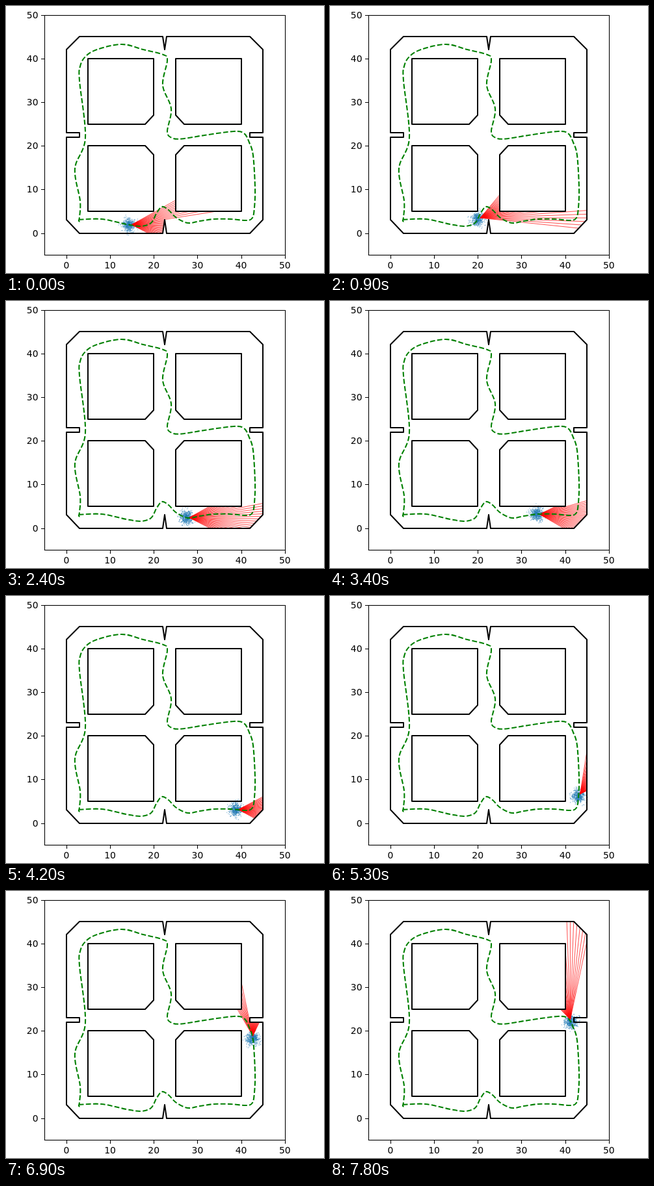
Write an HTML page with a canvas that moves like this. It is 489 by 411 pixels and loops after 8000 ms.

```html
<!DOCTYPE html>
<html lang="en">
<head>
<meta charset="utf-8">
<title>Particle filter localisation</title>
<style>
  html, body { margin: 0; width: 100%; height: 100%; overflow: hidden; background: #fff; }
  canvas, svg { position: absolute; left: 0; top: 0; width: 489px; height: 411px; }
  text { font: 13.9px "DejaVu Sans", sans-serif; }
</style>
</head>
<body>
<canvas id="scan" width="489" height="411"></canvas>
<svg id="map" width="489" height="411" viewBox="0 0 489 411"></svg>
<script>
const LOOP = 8000;
const RAD = Math.PI / 180;
const ROUTE_START = 78;   // distance already covered when the loop begins
const X = v => 59.2 + (v + 5) * 6.72;
const Y = v => 383.2 - (v + 5) * 6.72;

// The map is one quadrant mirrored both ways about its centre.
const border = [[22.5, 3], [23, 0], [42, 0], [45, 3], [45, 22], [42, 22], [42, 22.5]];
const block = [[5, 5], [20, 5], [20, 18], [18, 20], [5, 20], [5, 5]];
const mirrored = line => [[0, 0], [1, 0], [0, 1], [1, 1]].map(([mx, my]) =>
  line.map(([x, y]) => [Math.round(X(mx ? 45 - x : x)), Math.round(Y(my ? 45 - y : y))]));
const walls = [...mirrored(border), ...mirrored(block)];
const segments = walls.flatMap(w => w.slice(1).map((p, i) => [w[i], p]));

// Key points of the planned route, in pixels.
const route = [
  [112, 329], [147, 328], [185, 336], [207, 339], [223, 334], [232, 318], [240, 309],
  [250, 314], [262, 326], [280, 334], [298, 331], [320, 328], [345, 328], [370, 330],
  [379, 326], [382, 310], [383, 280], [380, 230], [374, 210], [366, 196], [350, 193],
  [305, 199], [270, 204.5], [255, 203], [248, 193], [254, 158], [241, 122], [248, 84],
  [242, 75], [211, 67], [178, 59], [140, 67], [122, 78], [114, 93], [113, 115],
  [122, 203], [106, 250], [114, 300], [113, 325], [112, 331], [117, 332]
];

// Time, distance travelled along the route, heading in degrees.
const drive = [
  [0, 0, 1], [900, 43, 22], [1300, 62, 43], [1500, 67, 40], [2000, 90, -26], [2400, 112, 1],
  [3400, 153, -2], [4400, 197, 0], [5300, 234, 53], [5700, 255, 84], [6900, 315, 92],
  [7800, 342, 106]
];

// The estimate updates in even bursts: first, last (tenths of a second), intervals.
const updates = [0];
for (const [first, last, n] of [[1, 15, 9], [18, 53, 22], [56, 78, 14]])
  for (let i = 0; i <= n; i++) updates.push(100 * Math.round(first + (last - first) * i / n));

function smooth(pts) {
  let d = `M${pts[0]}`;
  for (let i = 0; i < pts.length - 1; i++) {
    const a = pts[Math.max(i - 1, 0)], b = pts[i], c = pts[i + 1];
    const e = pts[Math.min(i + 2, pts.length - 1)];
    const p = b.map((v, k) => v + (c[k] - a[k]) / 6);
    const q = c.map((v, k) => v - (e[k] - b[k]) / 6);
    d += `C${p} ${q} ${c}`;
  }
  return d;
}

function drawMap() {
  let ticks = '', labels = '';
  for (let v = 0; v <= 50; v += 10) {
    ticks += `M${Math.round(X(v)) + .5} 384v5M59 ${Math.round(Y(v)) + .5}h-5`;
    labels += `<text x="${X(v)}" y="404" text-anchor="middle">${v}</text>`
            + `<text x="49.5" y="${Math.round(Y(v) + 5)}" text-anchor="end">${v}</text>`;
  }
  const outline = walls.map(w => `M${w.join('L')}`).join('');
  document.getElementById('map').innerHTML =
    `<g fill="none" stroke="#000">
      <path d="${outline}" stroke-width="2" stroke-linejoin="round" stroke-linecap="round"/>
      <path id="route" d="${smooth(route)}" stroke="#008000" stroke-width="2.08" stroke-dasharray="7.7 3.33"/>
      <path d="${ticks}" stroke-width="1.1"/>
      <rect x="59.5" y="14.5" width="370" height="369" stroke-width="1.1"/>
    </g>${labels}`;
}

function poseAt(t) {
  const i = Math.max(1, drive.findIndex(k => k[0] >= t));
  const a = drive[i - 1], b = drive[i];
  const k = (t - a[0]) / (b[0] - a[0]);
  const [dist, heading] = [1, 2].map(n => a[n] + (b[n] - a[n]) * k);
  const { x, y } = document.getElementById('route').getPointAtLength(ROUTE_START + dist);
  return { x, y, heading };
}

function castRay(x, y, dx, dy) {
  let best = 400;
  for (const [[ax, ay], [bx, by]] of segments) {
    const ex = bx - ax, ey = by - ay;
    const det = dx * ey - dy * ex;
    if (Math.abs(det) < 1e-9) continue;
    const dist = ((ax - x) * ey - (ay - y) * ex) / det;
    const u = ((ax - x) * dy - (ay - y) * dx) / det;
    if (dist > 0 && dist < best && u >= 0 && u <= 1) best = dist;
  }
  return best;
}

function random(seed) {
  return () => {
    seed = (seed + 0x6D2B79F5) | 0;
    let r = Math.imul(seed ^ (seed >>> 15), seed | 1);
    r ^= r + Math.imul(r ^ (r >>> 7), r | 61);
    return ((r ^ (r >>> 14)) >>> 0) / 4294967296;
  };
}

const ctx = document.getElementById('scan').getContext('2d');

function drawCloud({ x, y }, seed) {
  const rnd = random(seed * 977 + 5);
  ctx.fillStyle = 'rgba(31,119,180,.45)';
  for (let i = 0; i < 500; i++) {
    const r = Math.min(5 * Math.sqrt(-2 * Math.log(1 - rnd())), 16);
    const a = rnd() * Math.PI * 2;
    ctx.beginPath();
    ctx.arc(x + r * Math.cos(a), y + r * Math.sin(a), .8, 0, 7);
    ctx.fill();
  }
}

function drawRays({ x, y, heading }) {
  x += 4 * Math.cos(heading * RAD);
  y -= 4 * Math.sin(heading * RAD);
  ctx.strokeStyle = '#f00';
  ctx.lineWidth = .7;
  for (let off = -28; off <= 28; off += 2) {
    const a = (heading + off) * RAD;
    const dx = Math.cos(a), dy = -Math.sin(a);
    const d = castRay(x, y, dx, dy);
    ctx.beginPath();
    ctx.moveTo(x, y);
    ctx.lineTo(x + dx * d, y + dy * d);
    ctx.stroke();
  }
}

let shown = -1;
function tick() {
  const t = performance.now() % LOOP;
  let step = updates.length - 1;
  while (updates[step] > t) step--;
  if (step !== shown) {
    shown = step;
    const pose = poseAt(updates[step]);
    ctx.clearRect(0, 0, 489, 411);
    drawCloud(pose, step);
    drawRays(pose);
  }
  requestAnimationFrame(tick);
}

drawMap();
tick();
</script>
</body>
</html>
```
